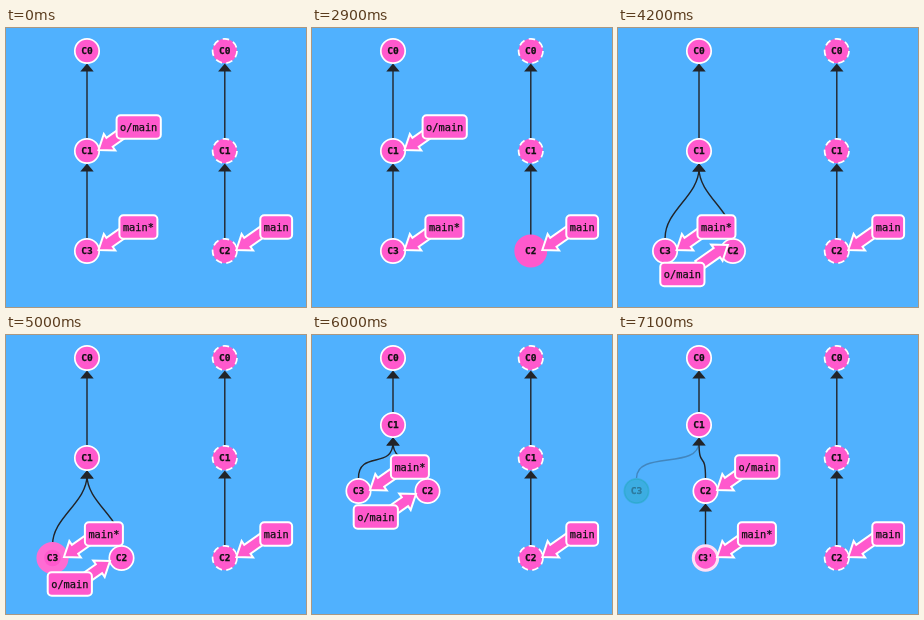
An HTML page with a canvas that plays this animation: 300 px wide and 279 px high, repeating every 7.2 s.

```html
<!DOCTYPE html>
<html lang="en">
<head>
<meta charset="utf-8">
<style>
html, body { margin: 0; width: 100%; height: 100%; overflow: hidden; background: #50b1fe; }
canvas { display: block; width: 300px; height: 279px; }
</style>
</head>
<body>
<canvas id="stage" width="300" height="279"></canvas>
<script>
const ctx = document.getElementById('stage').getContext('2d');
const LOOP = 7200;
const PINK = [255, 89, 205], WHITE = [255, 255, 255], TEAL = [15, 165, 163];
const INK = '#222428';
const MONO = '"DejaVu Sans Mono", monospace';

const lerp = (a, b, t) => a + (b - a) * t;
const mix = (a, b, t) => `rgb(${a.map((v, i) => Math.round(lerp(v, b[i], t)))})`;

// Ease-in-out as a cubic Bezier solved for its parameter.
function ease(n) {
  if (n <= 0) return 0;
  if (n >= 1) return 1;
  const q = 0.48 - n / 1.04, r = Math.sqrt(0.1734 + q * q);
  const s = Math.cbrt(r - q) + Math.cbrt(-r - q) + 0.5;
  return (1 - s) * 3 * s * s + s ** 3;
}
const tween = (time, start, length = 400) => ease((time - start) / length);

function write(text, x, y, size, weight = '') {
  ctx.font = `${weight} ${size}px ${MONO}`;
  ctx.textAlign = 'center';
  ctx.textBaseline = 'alphabetic';
  ctx.fillStyle = ctx.strokeStyle = '#111';
  ctx.lineWidth = 0.25;
  ctx.fillText(text, x, y + size * 0.36);
  ctx.strokeText(text, x, y + size * 0.36);
}

function edge(child, parent) {
  const top = child.y - 13, tip = parent.y + 13, end = tip + 4;
  ctx.globalAlpha = child.alpha ?? 1;
  ctx.strokeStyle = ctx.fillStyle = INK;
  ctx.lineWidth = 1.4;
  ctx.beginPath();
  ctx.moveTo(child.x, top);
  ctx.bezierCurveTo(child.x, top - 28, parent.x, end + 28, parent.x, end);
  ctx.stroke();
  ctx.beginPath();
  ctx.moveTo(parent.x, tip - 0.5);
  ctx.lineTo(parent.x + 6.7, tip + 7.5);
  ctx.lineTo(parent.x - 6.7, tip + 7.5);
  ctx.fill();
  ctx.globalAlpha = 1;
}

// glow runs from 0 (plain ring) to 1 (thick pink ring)
function node({ name, x, y, alpha = 1, glow = 0, dashed, fill = mix(PINK, PINK, 0), ring = WHITE }) {
  ctx.globalAlpha = alpha;
  ctx.beginPath();
  ctx.arc(x, y, 12.2, 0, Math.PI * 2);
  ctx.fillStyle = fill;
  ctx.fill();
  ctx.setLineDash(dashed ? [6.5, 4.5] : []);
  ctx.strokeStyle = mix(ring, PINK, glow);
  ctx.lineWidth = 1.7 * (1 + 4 * glow);
  ctx.stroke();
  ctx.setLineDash([]);
  write(name, x, y, name.length > 2 ? 8 : 9.5, 'bold');
  ctx.globalAlpha = 1;
}

function arrow(x, y, flipped) {
  ctx.save();
  ctx.translate(x, y);
  ctx.rotate(-35 * Math.PI / 180 + (flipped ? Math.PI : 0));
  ctx.beginPath();
  [[0, 0], [13.5, -10], [13.5, -5.5], [36, -5.5], [36, 5.5], [13.5, 5.5], [13.5, 10]]
    .forEach(p => ctx.lineTo(...p));
  ctx.closePath();
  paintPink();
  ctx.restore();
}

function paintPink() {
  ctx.fillStyle = mix(PINK, PINK, 0);
  ctx.fill();
  ctx.strokeStyle = '#fff';
  ctx.lineWidth = 2;
  ctx.stroke();
}

function label(text, x, y, tipX, tipY, flipped) {
  const width = text.length * 6.2 + 7;
  arrow(tipX, tipY, flipped);
  ctx.beginPath();
  ctx.roundRect(x - width / 2, y - 11.7, width, 23.4, 4);
  paintPink();
  write(text, x, y, 10.3);
}

const pin = (text, x, y) => label(text, x + 51.4, y - 24, x + 11.5, y - 1);

function draw(time) {
  const fetched = tween(time, 3838);
  const squeeze = tween(time, 5390);
  const rebased = tween(time, 6210);

  ctx.fillStyle = '#50b1fe';
  ctx.fillRect(0, 0, 300, 279);

  const level = lerp(223, 156, squeeze);
  const c0 = { name: 'C0', x: 81, y: 23 };
  const c1 = { name: 'C1', x: 81, y: lerp(123, 90, squeeze) };
  const c2 = { name: 'C2', x: 81 + 34.5 * fetched - 28 * rebased, y: level, alpha: fetched };
  const c3 = {
    name: 'C3', x: 81 - 34.5 * fetched - 28 * rebased, y: level,
    alpha: lerp(1, 0.3, rebased),
    glow: tween(time, 4598, 528) - squeeze,
    fill: mix(PINK, TEAL, rebased),
    ring: WHITE.map((v, i) => lerp(v, TEAL[i], rebased)),
  };
  const copy = {
    name: "C3'", x: c2.x, y: 223,
    alpha: rebased && lerp(0.3, 1, rebased),
    glow: tween(time, 6940, 528),
    fill: mix(TEAL, PINK, rebased),
    ring: TEAL.map((v, i) => lerp(v, WHITE[i], rebased)),
  };

  const glow = tween(time, 2218, 528) - tween(time, 3010);
  const remote = ['C0', 'C1', 'C2'].map((name, i) =>
    ({ name, x: 218.8, y: 23 + 100 * i, dashed: true }));
  remote[2].glow = glow;
  remote[2].dashed = glow === 0;

  edge(c1, c0);
  edge(c3, c1);
  edge(c2, c1);
  edge(copy, c2);
  edge(remote[1], remote[0]);
  edge(remote[2], remote[1]);
  [c0, c1, c3, c2, copy, ...remote].forEach(node);

  pin('main', remote[2].x, 223);
  pin('main*', lerp(c3.x, copy.x, rebased), lerp(c3.y, copy.y, rebased));

  // The remote branch label swings to the far side of its commit and back.
  const x = lerp(c1.x, c2.x, fetched), y = lerp(c1.y, c2.y, fetched) + 1;
  const side = 1 - 2 * (fetched - rebased);
  const flipped = fetched > 0 && rebased === 0;
  const swing = Math.sqrt(1 - side * side) * (flipped ? -1 : 1);
  label('o/main', x + 51.7 * side, y - 25 * side,
    x + 11.5 * side - 26 * swing, y - 2 * side + 29 * swing, flipped);
}

const begin = performance.now();
function tick() {
  draw((performance.now() - begin) % LOOP);
  requestAnimationFrame(tick);
}
tick();
</script>
</body>
</html>
```
